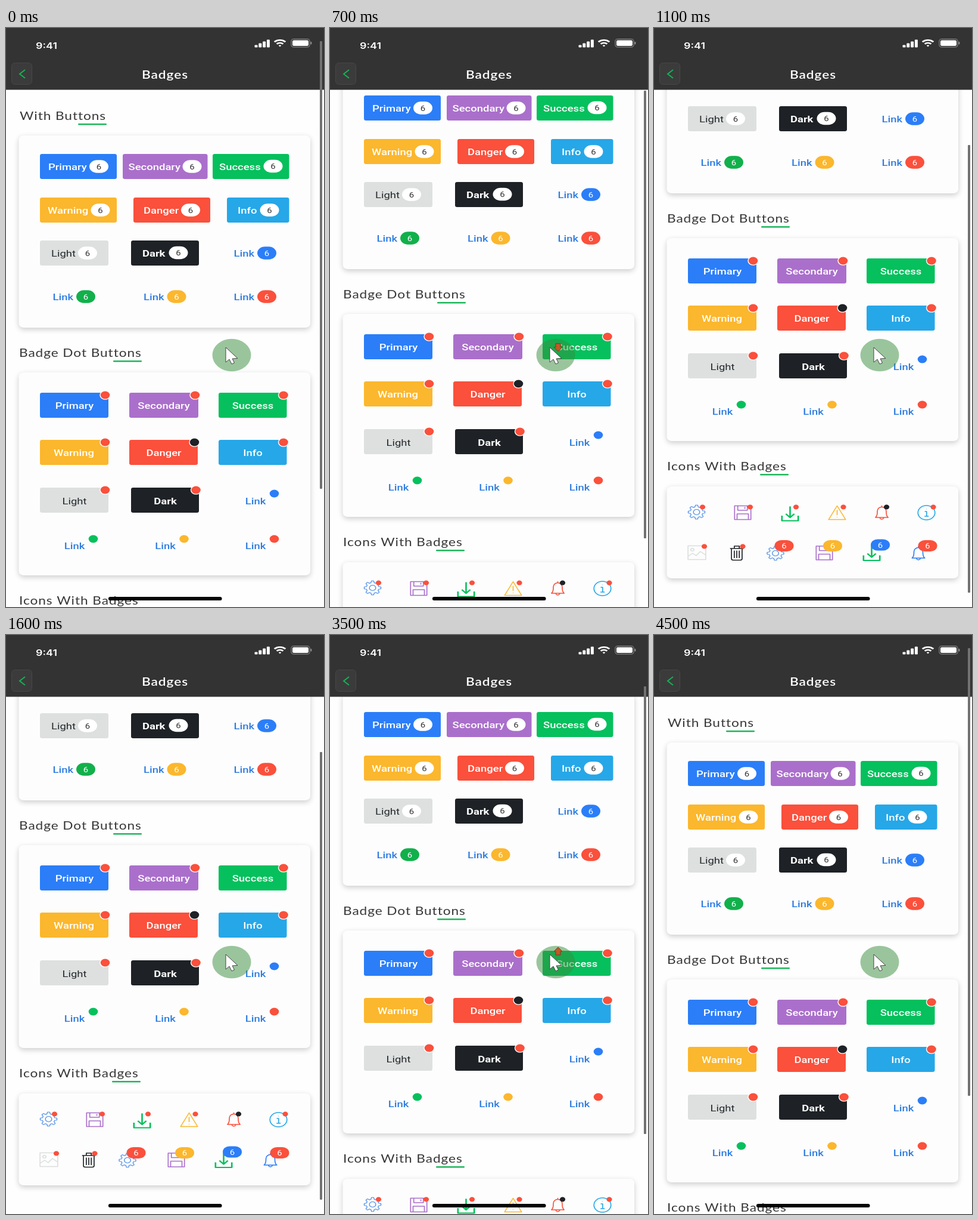
These frames come from a looping animation (534x970 px, 4.6 s). An HTML page with a canvas:

```html
<!DOCTYPE html>
<html lang="en">
<head>
<meta charset="utf-8">
<title>Badges</title>
<style>
html, body { margin: 0; height: 100%; overflow: hidden; background: #fff; }
canvas { display: block; }
</style>
</head>
<body>
<canvas id="stage" width="534" height="970"></canvas>
<script>
const ctx = document.getElementById('stage').getContext('2d');
const LOOP = 4600, STEP = 100;
const ASPECT = 1.19; // the whole screen is shown wider than tall
const BLUE = '#2b7ef8', PURPLE = '#aa6fcb', GREEN = '#05c05c', AMBER = '#fbb72d', RED = '#fa503c',
  CYAN = '#26a7e8', LIGHT = '#dde0df', DARK = '#1e2226', WHITE = '#fff', LINK = '#2f7de1', LINE = '#1fb65c';

function box(x, y, w, h, r, fill, stroke) {
  ctx.beginPath();
  ctx.roundRect(x, y, w, h, { x: r * ASPECT, y: r });
  ctx.fillStyle = fill;
  ctx.fill();
  if (stroke) { ctx.strokeStyle = stroke; ctx.lineWidth = 1; ctx.stroke(); }
}

function oval(x, y, rx, ry, fill) {
  ctx.beginPath();
  ctx.ellipse(x, y, rx, ry, 0, 0, 7);
  ctx.fillStyle = fill;
  ctx.fill();
}

function polygon(points, fill, stroke) {
  ctx.beginPath();
  points.forEach(([x, y]) => ctx.lineTo(x, y));
  ctx.closePath();
  ctx.fillStyle = fill;
  ctx.fill();
  ctx.strokeStyle = stroke;
  ctx.lineWidth = 1;
  ctx.stroke();
}

function text(str, x, y, font, color, align = 'left', spacing = 0) {
  ctx.save();
  ctx.translate(x, y);
  ctx.scale(ASPECT, 1);
  ctx.font = font;
  ctx.letterSpacing = spacing + 'px';
  ctx.textAlign = align;
  ctx.fillStyle = color;
  ctx.fillText(str, 0, 0);
  ctx.restore();
}

function label(str, x, y, color, align) {
  const weight = str === 'Light' ? 400 : str === 'Dark' ? 700 : 500;
  text(str, x, y + 6, weight + ' 15.5px Roboto, sans-serif', color, align);
}

function badge(x, y, fill, h = 21.5) {
  box(x - 16, y - h / 2, 32, h, h / 2, fill);
  text('6', x, y + 4.5, '12.5px Roboto, sans-serif', fill === WHITE ? '#333' : WHITE, 'center');
}

function dot(x, y, fill, edge) {
  if (edge) oval(x, y, 9.2, 7.8, WHITE);
  oval(x, y, 7.8, 6.5, fill);
}

function heading(str, x, y, lineX) {
  text(str, x, y, '19px Lato, sans-serif', '#383838', 'left', 0.8);
  box(lineX, y + 6, 48, 2.4, 1, LINE);
}

function card(y, h) {
  ctx.save();
  ctx.shadowColor = 'rgba(0,0,0,.2)';
  ctx.shadowBlur = 10;
  ctx.shadowOffsetY = 3;
  box(21.5, y, 489.5, h, 7, '#fdfdfd');
  ctx.restore();
}

const textOn = fill => !fill ? LINK : fill === LIGHT ? '#26292c' : WHITE;

// label, left, width, fill, text x, badge x, middle y, badge colour
const countButtons = [
  ['Primary', 57, 129, BLUE, 71, 156, 232],
  ['Secondary', 196, 142.5, PURPLE, 205.5, 312.5, 232],
  ['Success', 347, 128.5, GREEN, 358, 448.5, 231.5],
  ['Warning', 57, 129, AMBER, 70, 158.5, 305],
  ['Danger', 214, 129, RED, 231, 310, 305],
  ['Info', 371, 104.5, CYAN, 389, 442.5, 305],
  ['Light', 57, 115, LIGHT, 76, 137, 377],
  ['Dark', 210, 114, DARK, 229, 289.5, 376.5],
  ['Link', 0, 0, '', 382.5, 438, 377, BLUE],
  ['Link', 0, 0, '', 78.5, 134, 450, '#11b04b'],
  ['Link', 0, 0, '', 231, 286.5, 450, AMBER],
  ['Link', 0, 0, '', 382.5, 438, 450, RED],
];

// label, left, width, fill, text centre, middle y, dot x, dot y, dot colour
const dotButtons = [
  ['Primary', 57, 115, BLUE, 115, 632, 166.5, 615, RED],
  ['Secondary', 207, 116, PURPLE, 265, 632, 317.5, 615, RED],
  ['Success', 357, 114.5, GREEN, 414.5, 631.5, 466, 615, RED],
  ['Warning', 57, 115, AMBER, 114, 711, 166.5, 694, RED],
  ['Danger', 207, 115, RED, 265, 711, 316.5, 694, DARK],
  ['Info', 357, 114.5, CYAN, 414.5, 711, 466, 694, RED],
  ['Light', 57, 115, LIGHT, 115, 791.5, 166.5, 774, RED],
  ['Dark', 210, 114, DARK, 267.5, 791.5, 319, 774, RED],
  ['Link', 0, 0, '', 419, 791.5, 450.5, 780, BLUE],
  ['Link', 0, 0, '', 115, 867, 146.5, 856, GREEN],
  ['Link', 0, 0, '', 267.5, 867, 299, 856, AMBER],
  ['Link', 0, 0, '', 419, 867, 450.5, 856, RED],
];

function gearPath() {
  let d = '';
  for (let i = 0; i < 96; i++) {
    const a = i / 96 * 2 * Math.PI;
    const r = 10.3 + 1.5 * Math.max(-1, Math.min(1, 2 * Math.cos(8 * a)));
    d += (i ? 'L' : 'M') + r * Math.cos(a) + ' ' + r * Math.sin(a);
  }
  return d + 'ZM4.5 0A4.5 4.5 0 1 1 -4.5 0A4.5 4.5 0 1 1 4.5 0Z';
}

const icons = {
  gear: gearPath(),
  save: 'M-11.5 -11.5H9.5L11.5 -9.5V11.5H-11.5ZM-7 -11.5V-4H6.5V-11.5M3 -9.5V-6.5M-8 11.5V2H8V11.5',
  download: 'M0 -12.5V6M-6 0L0 6L6 0M-11.5 3V11.5H11.5V3',
  alert: 'M0 -11.5L12 11.5H-12ZM0 -4.5V4M0 7.3V8',
  bell: 'M-9 8.5C-6 6 -6.3 2 -6.3 -2A6.3 7 0 0 1 6.3 -2C6.3 2 6 6 9 8.5ZM0 -9V-11.5M-2.7 8.5A2.7 3 0 0 0 2.7 8.5',
  info: 'M12 0A12 12 0 1 1 -12 0A12 12 0 1 1 12 0ZM-2.5 -2H.3V6M-2.8 6H3.2M0 -6.3V-5.7',
  image: 'M-12.5 -11.5H12.5V11.5H-12.5ZM-4 -5A2.3 2.3 0 1 1 -8.6 -5A2.3 2.3 0 1 1 -4 -5M-12.5 6L-6 1L-1 5L5 -2L12.5 4',
  trash: 'M-9.5 -7.5H9.5M-3.5 -7.5V-11.5H3.5V-7.5M-7.5 -7.5V9.5Q-7.5 12 -5 12H5Q7.5 12 7.5 9.5V-7.5M-3.5 -4V8.5M0 -4V8.5M3.5 -4V8.5',
};
for (const name in icons) icons[name] = new Path2D(icons[name]);

function icon(name, x, y, color) {
  ctx.save();
  ctx.translate(x, y);
  ctx.scale(ASPECT, 1);
  ctx.strokeStyle = color;
  ctx.lineWidth = name === 'download' ? 2.2 : name === 'gear' ? 1.1 : 1.4;
  ctx.lineJoin = 'round';
  ctx.stroke(icons[name]);
  ctx.restore();
}

// icon, x, y, colour, mark x, mark y, mark colour, has a count
const iconBadges = [
  ['gear', 71.5, 1036, '#4a8be8', 81.5, 1027.5, RED],
  ['save', 149, 1037, PURPLE, 161.5, 1027.5, RED],
  ['download', 228.5, 1039, GREEN, 238.5, 1027.5, RED],
  ['alert', 307.5, 1037, AMBER, 318, 1027.5, RED],
  ['bell', 382.5, 1036.5, RED, 390.5, 1027.5, DARK],
  ['info', 457.5, 1037, CYAN, 469, 1027.5, RED],
  ['image', 72, 1104, '#dcdede', 84.5, 1093.5, RED],
  ['trash', 139, 1104.5, DARK, 149, 1093.5, RED],
  ['gear', 204, 1105, '#4a8be8', 218.5, 1092.5, RED, true],
  ['save', 286, 1104.5, PURPLE, 300, 1092.5, AMBER, true],
  ['download', 365.5, 1105.5, GREEN, 380, 1091, BLUE, true],
  ['bell', 444, 1104.5, BLUE, 459.5, 1092.5, RED, true],
];

function content() {
  heading('With Buttons', 23, 154, 121);
  card(180, 322);
  for (const [name, x, w, fill, tx, bx, y, color = WHITE] of countButtons) {
    if (fill) box(x, Math.round(y) - 21, w, 42, 3, fill);
    label(name, tx, y, textOn(fill));
    badge(bx, y, color);
  }

  heading('Badge Dot Buttons', 22, 551, 180);
  card(577, 340);
  for (const [name, x, w, fill, tx, y, dx, dy, color] of dotButtons) {
    if (fill) box(x, dy - 4, w, 42, 3, fill);
    label(name, tx, y, textOn(fill), 'center');
    dot(dx, dy, color, fill);
  }

  heading('Icons With Badges', 22, 966, 178);
  card(993, 154);
  for (const [name, x, y, color, mx, my, mark, count] of iconBadges) {
    icon(name, x, y, color);
    if (count) badge(mx, my, mark, 19);
    else oval(mx, my, 4.6, 4, mark);
  }
}

function header() {
  box(0, 0, 534, 103.5, 0, '#333');
  text('9:41', 50, 35, '600 15px Inter, sans-serif', WHITE);
  [4, 7, 10, 13].forEach((h, i) => box(417.5 + i * 6.8, 32.5 - h, 5, h, 1, WHITE));

  ctx.save();
  ctx.translate(460, 31.5);
  ctx.scale(ASPECT, 1);
  ctx.strokeStyle = WHITE;
  ctx.lineWidth = 2.6;
  for (const r of [1.5, 6.5, 11.3]) {
    ctx.beginPath();
    ctx.arc(0, 0, r, -2.33, -0.81);
    ctx.stroke();
  }
  ctx.restore();

  box(479, 18.5, 31, 13.5, 3.5, '#333', '#999');
  box(481, 20.5, 27, 9.5, 2, WHITE);
  box(511.5, 23, 1.8, 4.5, 0.8, '#999');

  box(9.5, 58.5, 34, 36, 5, '#3b3b3b', '#474747');
  ctx.beginPath();
  [[32, 70], [23, 77], [32, 84]].forEach(p => ctx.lineTo(...p));
  ctx.strokeStyle = '#14b356';
  ctx.lineWidth = 2;
  ctx.stroke();
  text('Badges', 267, 85, '600 19px Lato, sans-serif', WHITE, 'center', 0.8);
}

function pointer(arrowY, dir) {
  oval(379, 548, 32.5, 27.3, 'rgba(56,142,60,.5)');
  if (dir) {
    const shape = [[-4, -6], [4, -6], [4, 0], [7, 0], [0, 7], [-7, 0], [-4, 0]];
    polygon(shape.map(([x, y]) => [383 + x, arrowY + y * dir]), '#bf5a28', '#6b431c');
  }
  polygon([[369, 535], [369, 560], [375, 555], [379, 563], [383.5, 561], [380, 554], [389, 553.5]], WHITE, '#444');
}

// Values reached at each step of the scroll down and back up
const DOWN = 6, UP = 33;
const pageDown = [36, 98, 153, 203, 219, 225], pageUp = [189, 136, 82, 36, 10, 0];
const thumbDown = [40, 83, 125, 161, 171, 174], thumbUp = [133, 99, 64, 28, 8, 0];

function valueAt(step, down, up) {
  if (step < DOWN) return 0;
  return step < UP ? down[Math.min(step - DOWN, 5)] : up[Math.min(step - UP, 5)];
}

function draw(now) {
  const step = Math.floor(now % LOOP / STEP);
  box(0, 0, 534, 970, 0, '#fefefe');
  ctx.save();
  ctx.translate(0, -valueAt(step, pageDown, pageUp));
  content();
  ctx.restore();

  header();
  box(527, 22 + valueAt(step, thumbDown, thumbUp), 4, 750, 1, '#727272');
  box(172, 953, 190.5, 6, 2.5, '#050505');

  const goingDown = step >= DOWN && step < DOWN + 5;
  const goingUp = step >= UP && step < UP + 5;
  if (goingDown) pointer(531.5 + 3.2 * (step - DOWN), 1);
  else if (goingUp) pointer(540 - 5 * (step - UP), -1);
  else pointer();
  requestAnimationFrame(draw);
}
requestAnimationFrame(draw);
</script>
</body>
</html>
```
